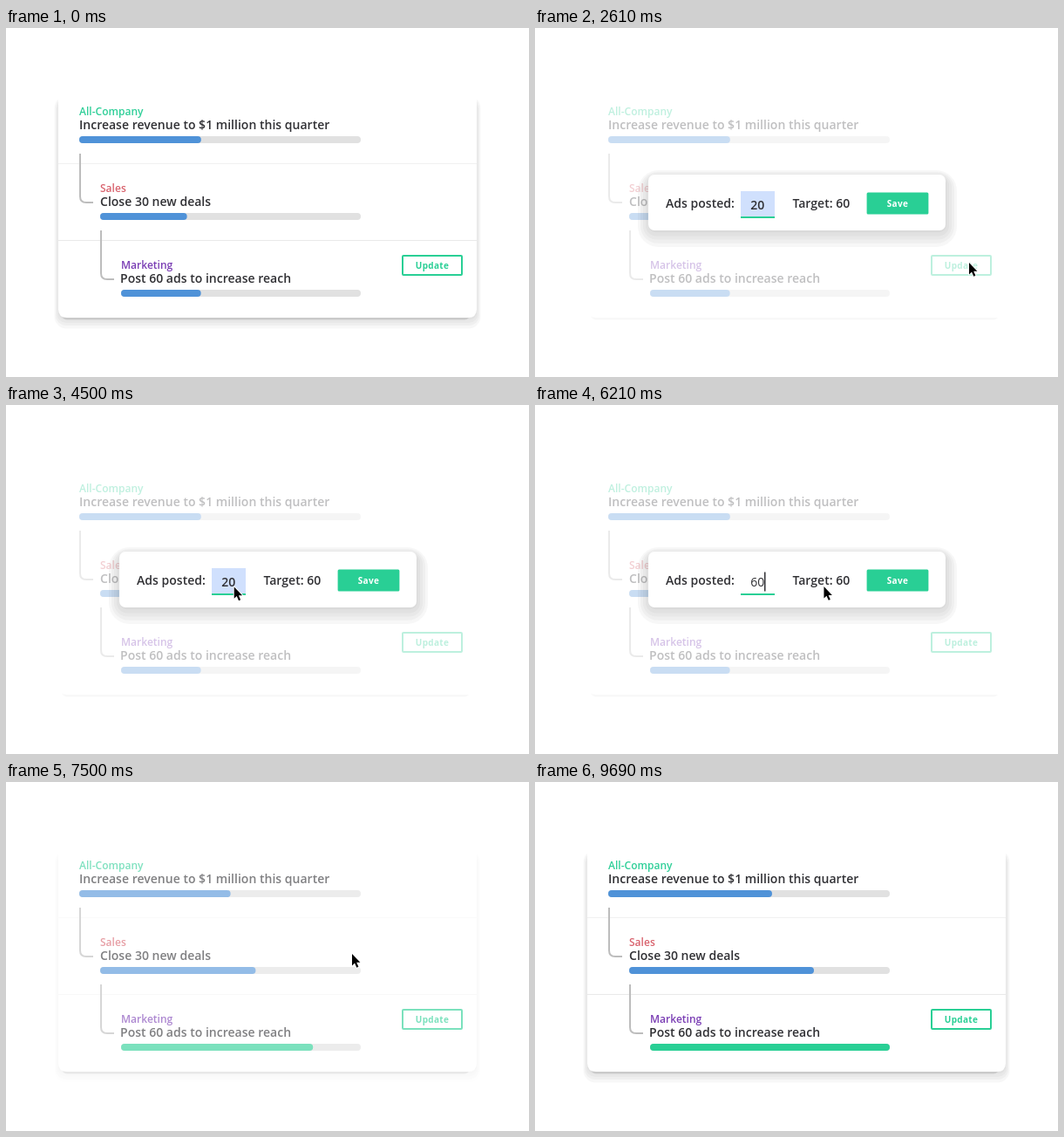
Animation, 600 px wide and 400 px high, one loop 9870 ms. Source, as an HTML page:

```html
<!DOCTYPE html>
<html lang="en">
<head>
<meta charset="utf-8">
<title>Goal progress</title>
<style>
  html, body { margin: 0; width: 100%; height: 100%; overflow: hidden; background: #fff; }
  svg { display: block; width: 600px; height: 400px; }
  text { font: 600 14px "Open Sans", "Noto Sans", sans-serif; letter-spacing: .015px; fill: #303034; }
  .label { font-size: 12px; }
  .btn { font-size: 10px; font-weight: 700; letter-spacing: .3px; text-anchor: middle; }
  .line { fill: none; stroke: #bdbdbd; stroke-width: 2; }
</style>
</head>
<body>
<svg id="stage" viewBox="0 0 600 400" xmlns="http://www.w3.org/2000/svg">
  <g id="board">
    <g id="cardShadow"></g>
    <rect x="64" y="320" width="468" height="14.5" rx="6" fill-opacity=".1"/>
    <path d="M60 70H540V322Q540 332 530 332H70Q60 332 60 322Z" fill="#fff"/>
    <g id="rules">
      <path d="M60 155.5H540" stroke="#f1f1f1"/>
      <path d="M60 243.5H540" stroke="#e9e9e9"/>
    </g>
    <g id="goals"></g>
    <rect x="455" y="261" width="68" height="22" rx="1" fill="#fff" stroke="#29cf95" stroke-width="2"/>
    <text class="btn" x="489" y="276" style="fill:#29cf95">Update</text>
  </g>
  <g id="modal">
    <g id="modalShadow"></g>
    <rect x="130" y="168" width="341" height="64" rx="7" fill="#fff"/>
    <text x="150" y="206">Ads posted:</text>
    <rect id="selection" x="236" y="187" width="39" height="30" fill="#d0e0fd"/>
    <rect x="236" y="216" width="39" height="2" fill="#29cf95"/>
    <text id="value" x="247.3" y="207.6"></text>
    <rect id="caret" y="191.5" width="1.5" height="22" fill="#303034"/>
    <text x="295.4" y="206">Target: 60</text>
    <rect x="380.6" y="188.6" width="70.8" height="24.8" rx="1.5" fill="#29cf95"/>
    <text class="btn" x="416" y="205.3" style="fill:#fff">Save</text>
  </g>
  <path id="cursor" d="M0 0V13.4L3 10.6L5.3 15.7L7.4 14.8L5.2 9.8H9.4Z"
        fill="#000" stroke="#fff" stroke-width="1.8" stroke-linejoin="round" paint-order="stroke"/>
</svg>
<script>
const LOOP = 9870;
const GREEN = '#29cf95', BLUE = '#4f92d8';
const $ = id => document.getElementById(id);

function add(parent, tag, attrs, text) {
  const el = document.createElementNS('http://www.w3.org/2000/svg', tag);
  for (const key in attrs) el.setAttribute(key, attrs[key]);
  if (text) el.textContent = text;
  parent.appendChild(el);
  return el;
}

// Stacked boxes that shrink towards the panel form the stepped shadow.
function shadow(parent, { x, y, right, bottom, side, lift, steps }) {
  for (let i = 0; i < steps; i++) {
    const inset = side * i, height = bottom - y - (lift + 2) * i;
    add(parent, 'rect', {
      x: x + inset, y: y + 2 * i, width: right - x - 2 * inset, height,
      rx: 8 + side * (steps - 1 - i) * 1.3, 'fill-opacity': .03
    });
  }
}
shadow($('cardShadow'), { x: 55.5, y: 78, right: 544.5, bottom: 344.5, side: 1.5, lift: 3.4, steps: 4 });
shadow($('modalShadow'), { x: 118, y: 163, right: 484, bottom: 251, side: 3, lift: 4.2, steps: 5 });

// from and to are the filled parts of each bar.
const goals = [
  { name: 'All-Company', title: 'Increase revenue to $1 million this quarter', color: '#2fcf98', from: .433, to: .582 },
  { name: 'Sales', title: 'Close 30 new deals', color: '#d8626d', from: 1 / 3, to: .709 },
  { name: 'Marketing', title: 'Post 60 ads to increase reach', color: '#7a3db4', from: 1 / 3, to: 1 }
];
goals.forEach((g, i) => {
  const x = 84 + 24 * i, y = 96 + 88 * i;
  const bar = fill => add($('goals'), 'rect', { x, y: y + 28, width: g.width, height: 8, rx: 4, fill });
  g.width = 407 - x;
  add($('goals'), 'text', { class: 'label', x, y: y + 4, style: `fill:${g.color}` }, g.name);
  add($('goals'), 'text', { x: x - (i === 2 ? 1 : 0), y: y + 20 }, g.title);
  bar('#e1e1e1');
  g.bar = bar(BLUE);
  if (i < 2) add($('goals'), 'path', { class: 'line', d: `M${x + 1} ${y + 48}v49q0 7 7 7h8` });
});

const span = (t, a, b) => Math.max(0, Math.min(1, (t - a) / (b - a)));
const mix = (a, b, k) => a + (b - a) * k;

// cubic-bezier(.4, 0, .2, 1)
function ease(p) {
  if (p <= 0 || p >= 1) return p;
  let lo = 0, hi = 1, s = p;
  for (let i = 0; i < 24; i++) {
    s = (lo + hi) / 2;
    const x = 1.2 * s * (1 - s) ** 2 + .6 * s * s * (1 - s) + s ** 3;
    if (x < p) lo = s; else hi = s;
  }
  return s * s * (3 - 2 * s);
}

// The cursor travels on curves between these stops.
const outside = [612, 223], update = [497, 268], field = [255.5, 204.5], save = [396, 196];
const moves = [
  { start: 990, end: 1830, a: outside, bend: [556, 260], b: update },
  { start: 3400, end: 4770, a: update, bend: [365, 267], b: field },
  { start: 5820, end: 6870, a: field, bend: [320, 215], b: save },
  { start: 8250, end: 9120, a: save, bend: [504, 209], b: outside }
];
function cursorAt(t) {
  const { start, end, a, bend, b } = moves.filter(m => t >= m.start).pop() || moves[0];
  const k = ease(span(t, start, end));
  return [0, 1].map(i => mix(mix(a[i], bend[i], k), mix(bend[i], b[i], k), k));
}

function draw(t) {
  const dim = span(t, 2280, 2460) - span(t, 7380, 7650);
  $('board').setAttribute('opacity', 1 - .7 * dim);
  $('cardShadow').setAttribute('opacity', 1 - dim);
  $('rules').setAttribute('opacity', 1 - dim);

  const show = span(t, 2430, 2610) - span(t, 7200, 7380);
  const scale = mix(.88, 1, show);
  $('modal').setAttribute('opacity', show);
  $('modal').setAttribute('transform',
    `translate(300.5 200) scale(${scale}) translate(-300.5 -200)`);

  const typing = t >= 4980;
  $('value').textContent = t < 4920 ? '20' : t < 4980 ? '' : t < 5460 ? '6' : '60';
  $('value').style.fontWeight = typing ? 500 : 600;
  $('selection').setAttribute('opacity', t < 4920 ? 1 : 0);
  $('caret').setAttribute('opacity', typing ? 1 : 0);
  $('caret').setAttribute('x', t < 5460 ? 255 : 263);

  const grow = ease(span(t, 7380, 7650));
  for (const g of goals) {
    g.bar.setAttribute('width', g.width * mix(g.from, g.to, grow));
    g.bar.setAttribute('fill', g.to === 1 && grow > 0 ? GREEN : BLUE);
  }

  const [x, y] = cursorAt(t);
  $('cursor').setAttribute('transform', `translate(${x + 1} ${y + 1})`);
}

const begin = performance.now();
function tick() {
  draw((performance.now() - begin) % LOOP);
  requestAnimationFrame(tick);
}
tick();
</script>
</body>
</html>
```
